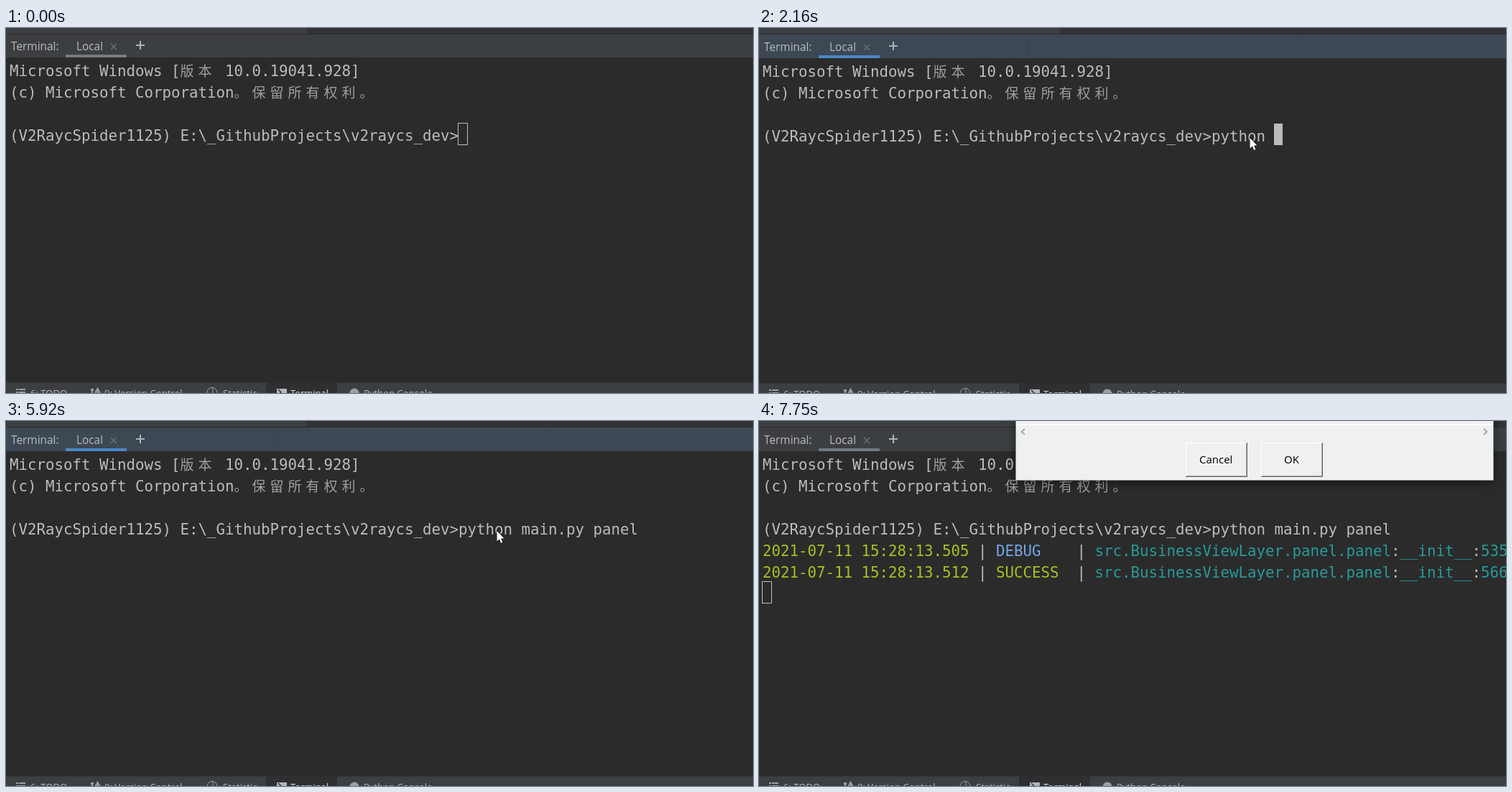
An HTML page with a canvas that plays this animation: 1040 px wide and 508 px high, repeating every 8 s.

```html
<!DOCTYPE html>
<html lang="zh-CN">
<head>
<meta charset="utf-8">
<title>Terminal</title>
<style>
  html, body { margin: 0; width: 100%; height: 100%; overflow: hidden; background: #2b2b2b; }
  canvas { display: block; }
</style>
</head>
<body>
<canvas id="stage" width="1040" height="508"></canvas>
<script>
const ctx = document.getElementById('stage').getContext('2d');
const LOOP = 8000;
const PITCH = 12.5, LEFT = 4.9, TOP = 43, ROW = 30;
const MONO = '20.8px "DejaVu Sans Mono", "Noto Sans Mono", monospace';
const CJK = '300 19px "Noto Sans CJK SC", "Noto Sans CJK", sans-serif';
const UI = '"Open Sans", "Noto Sans", sans-serif';
const GREY = '#bbbbbb', DIM = '#a0a0a0', LIME = '#a8c023', BLUE = '#74a6e2', TEAL = '#299999';

const PROMPT = '(V2RaycSpider1125) E:\\_GithubProjects\\v2raycs_dev>';
const COMMAND = 'python main.py panel';

// [time, typed characters]
const TYPING = [[0, 0], [1120, 1], [1600, 3], [1730, 5], [2010, 6], [2150, 7], [2290, 8],
  [2430, 9], [2570, 11], [2710, 12], [2990, 14], [3130, 15], [3410, 16], [3550, 17],
  [3690, 19], [3830, 20]];
const BLINKS = [[980, 1120], [4950, 5500], [5920, 6480], [7040, 7190]];
const SHIFT_AT = 140, FOCUS_AT = 420, ENTER_AT = 3980, LOG_AT = 7190,
  BLUR_AT = 7500, DIALOG_AT = 7610, SETTLED_AT = 7750;

const at = (table, t) => table.filter(step => step[0] <= t).pop()[1];
const within = (t, [from, to]) => t >= from && t < to;
const cellX = col => Math.floor(LEFT + col * PITCH);

function rect(x, y, w, h, color) {
  ctx.fillStyle = color;
  ctx.fillRect(x, y, w, h);
}

function label(text, x, y, size, color) {
  ctx.font = `${size}px ${UI}`;
  ctx.fillStyle = color;
  ctx.fillText(text, x, y);
}

function path(points, color, width, close) {
  ctx.beginPath();
  points.forEach(([x, y]) => ctx.lineTo(x, y));
  if (close) ctx.closePath();
  ctx.strokeStyle = color;
  ctx.lineWidth = width;
  ctx.stroke();
}

// Writes text on the terminal grid; CJK characters take two cells.
function write(text, row, col = 0, color = GREY) {
  for (const char of text) {
    const wide = char > '\u2fff';
    ctx.font = wide ? CJK : MONO;
    ctx.fillStyle = wide ? DIM : color;
    ctx.fillText(char, LEFT + col * PITCH, TOP + row * ROW + 25);
    col += wide ? 2 : 1;
  }
  return col;
}

function logLine(row, time, level, levelColor, line) {
  const parts = [
    ['2021-07-11 15:28:13.' + time, LIME], [' | ', GREY], [level.padEnd(8), levelColor],
    [' | ', GREY], ['src.BusinessViewLayer.panel.panel', TEAL], [':', GREY],
    ['__init__', TEAL], [':', GREY], [line, TEAL]];
  parts.reduce((col, [text, color]) => write(text, row, col, color), 0);
}

function caret(col, row, solid) {
  const x = cellX(col), y = TOP + row * ROW, w = cellX(col + 1) - x;
  if (solid) return rect(x, y, w, ROW, GREY);
  ctx.strokeStyle = GREY;
  ctx.lineWidth = 1;
  ctx.strokeRect(x + .5, y + .5, w, ROW);
}

function header(focused) {
  rect(0, 9, 1040, 33, focused ? '#3d4855' : '#3c3f41');
  if (focused) [374, 749].forEach(x => rect(x, 9, 1, 33, '#3a4450'));
  label('Terminal:', 7, 32, 15.4, GREY);
  label('Local', 98, 32, 15.4, GREY);
  path([[146, 23], [154, 31]], '#6e7275', 1.2);
  path([[154, 23], [146, 31]], '#6e7275', 1.2);
  rect(181, 24, 12, 2, '#afb1b3');
  rect(186, 19, 2, 12, '#afb1b3');
  rect(83, 38, 85, 4, focused ? '#4a88c7' : '#747a80');
}

function editorEdge() {
  rect(0, 0, 419, 8, '#3c3f41');
  rect(419, 0, 621, 8, '#313335');
  rect(0, 8, 1040, 1, '#2b2b2b');
}

function toolBar() {
  const icon = '#9da0a2';
  rect(0, 494, 1040, 15, '#3c3f41');
  rect(0, 494, 1040, 1, '#323435');
  rect(362, 494, 99, 15, '#2d2f31');
  [['6: TODO', 34], ['9: Version Control', 137], ['Statistic', 302],
   ['Terminal', 396, '#e0e0e0'], ['Python Console', 498]]
    .forEach(([text, x, color = GREY]) => label(text, x, 514, 13.1, color));

  [503, 507].forEach(y => {
    rect(14, y, 3, 2, icon);
    rect(18, y, 9, 2, icon);
  });
  rect(119, 503, 2, 6, icon);
  rect(118, 503, 4, 3, icon);
  path([[124, 509], [127.5, 503], [131, 509]], icon, 2);
  rect(126.5, 503, 2, 6, icon);
  ctx.beginPath();
  ctx.arc(287, 508.5, 7, 0, 7);
  ctx.strokeStyle = icon;
  ctx.lineWidth = 1;
  ctx.stroke();
  path([[288, 501], [288, 509]], icon, 1);
  rect(377, 503, 14, 6, '#b4b7b9');
  path([[379, 504], [383, 508], [379, 512]], '#2d2f31', 1.5);
  ctx.beginPath();
  ctx.arc(485, 509, 6.5, 0, 7);
  ctx.fillStyle = icon;
  ctx.fill();
}

function pointer() {
  const outline = [[683.5, 153], [683.5, 167.5], [687, 164.5], [689, 170],
    [691.5, 169], [689.2, 163.5], [693.5, 163.5]];
  path(outline, '#000', 1.2, true);
  ctx.fillStyle = '#fff';
  ctx.fill();
}

function button(text, x, textX) {
  rect(x, 30, 86, 48, '#696969');
  rect(x, 30, 85, 47, '#ffffff');
  rect(x + 1, 31, 84, 46, '#a0a0a0');
  rect(x + 1, 31, 83, 45, '#f0f0f0');
  label(text, textX, 59, 15, '#000');
}

function dialog(opacity) {
  ctx.save();
  ctx.globalAlpha = opacity;
  ctx.shadowColor = 'rgba(0,0,0,.5)';
  ctx.shadowBlur = 12;
  ctx.shadowOffsetY = 3;
  rect(357, -20, 666, 103, '#7c909a');
  ctx.shadowColor = 'transparent';
  rect(358, 0, 664, 82, '#f0f0f0');
  rect(358, 4, 664, 2, '#ffffff');
  rect(1001, 0, 1, 5, '#ffffff');
  path([[370, 11], [365.5, 15], [370, 19]], '#a8a8a8', 2);
  path([[1009, 11], [1013.5, 15], [1009, 19]], '#a8a8a8', 2);
  button('Cancel', 594, 613);
  button('OK', 699, 731);
  ctx.restore();
}

function draw(t) {
  const focused = within(t, [FOCUS_AT, BLUR_AT]);
  const typed = at(TYPING, t);

  rect(0, 0, 1040, 508, '#2b2b2b');

  ctx.save();
  if (t < SHIFT_AT) ctx.translate(0, -1);
  header(focused);
  write('Microsoft Windows [版本 10.0.19041.928]', 0);
  write('(c) Microsoft Corporation。保留所有权利。', 1);
  write(PROMPT + COMMAND.slice(0, typed), 3);
  if (t >= LOG_AT) {
    logLine(4, '505', 'DEBUG', BLUE, '535');
    logLine(5, '512', 'SUCCESS', LIME, '566');
  }
  if (!BLINKS.some(span => within(t, span))) {
    if (t >= LOG_AT) caret(0, 6, focused);
    else if (t >= ENTER_AT) caret(0, 4, focused);
    else caret(PROMPT.length + typed, 3, focused);
  }
  toolBar();
  ctx.restore();
  editorEdge();

  if (within(t, [SHIFT_AT, SETTLED_AT])) pointer();
  if (t >= DIALOG_AT) dialog(t < SETTLED_AT ? .5 : 1);
}

const start = performance.now();
function tick() {
  draw((performance.now() - start) % LOOP);
  requestAnimationFrame(tick);
}
tick();
</script>
</body>
</html>
```
